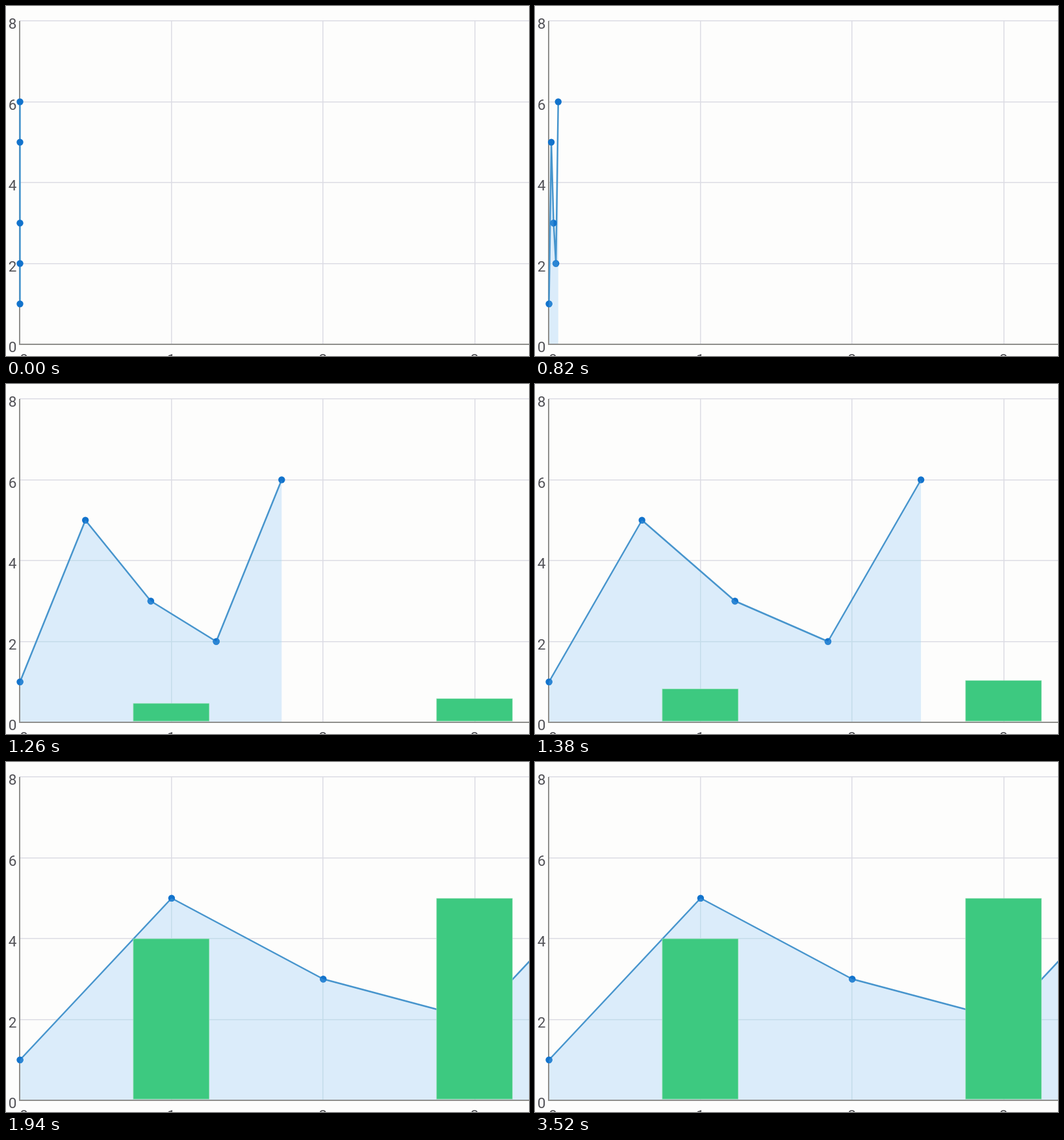
An HTML page with a canvas for the animation above (3540 ms loop, 805 by 539 pixels).

```html
<!DOCTYPE html>
<html lang="en">
<head>
<meta charset="utf-8">
<title>Line and bar chart</title>
<style>
  html, body { margin: 0; width: 100%; height: 100%; overflow: hidden; background: #fdfdfc; }
  canvas { display: block; }
</style>
</head>
<body>
<canvas id="chart" width="805" height="539"></canvas>
<script>
const W = 805, H = 539, LOOP = 3540;
const X0 = 21.5, Y0 = 521, STEP = 233.4, UNIT = 62.25;
const values = [1, 5, 3, 2, 6];
const bars = [{ x: 1, value: 4 }, { x: 3, value: 5 }];
const ctx = document.getElementById('chart').getContext('2d');

const px = x => X0 + x * STEP;
const py = y => Y0 - y * UNIT;
const clamp = v => Math.min(1, Math.max(0, v));

// Pictures are held 20, 20 and 100 ms; each group of three spans 8 ticks of motion.
function ticks(ms) {
  const t = ms + 20, rest = t % 140;
  return Math.floor(t / 140) * 8 + (rest < 20 ? 0 : rest < 40 ? 3 : 6);
}

const lineEase = n => Math.pow(clamp((n - 34.8) / 53.2), 3);

function barEase(n) {
  const p = clamp((n - 32.6) / 61.3);
  return p ? Math.pow(2, 10 * (p - 1)) : 0;
}

function grid(color) {
  ctx.fillStyle = color;
  for (let v = 2; v <= 8; v += 2) ctx.fillRect(21, Math.round(py(v)) - 1, W, 1.5);
  for (let x = 1; x <= 3; x++) ctx.fillRect(Math.round(px(x)) - 1, 23, 1.5, Y0 - 23);
}

function axes() {
  ctx.fillStyle = '#8f8f8c';
  ctx.fillRect(20, 23, 2, 499);
  ctx.fillRect(20, 520, W, 2);
}

function labels() {
  ctx.fillStyle = '#515156';
  ctx.font = '22.5px Roboto, sans-serif';
  ctx.textAlign = 'right';
  for (let v = 0; v <= 8; v += 2) ctx.fillText(v, 16.5, py(v) + 12);
  ctx.textAlign = 'center';
  for (let x = 0; x <= 3; x++) ctx.fillText(x, x ? px(x) - 0.5 : 27.5, 552);
}

function dots(points, color) {
  ctx.fillStyle = color;
  for (const [x, y] of points) {
    ctx.beginPath();
    ctx.arc(x, y, 5.2, 0, Math.PI * 2);
    ctx.fill();
  }
}

function line(scale) {
  const points = values.map((v, i) => [px(i * scale), py(v)]);
  const stroke = new Path2D();
  points.forEach(([x, y]) => stroke.lineTo(x, y));
  const area = new Path2D(stroke);
  area.lineTo(points[4][0], 520);
  area.lineTo(X0, 520);
  area.closePath();

  ctx.save();
  ctx.clip(area);
  ctx.fillStyle = '#dbecfa';
  ctx.fillRect(22, 0, W, 520);
  grid('#c4dcea');
  ctx.restore();

  ctx.strokeStyle = '#4795cd';
  ctx.lineWidth = 2.5;
  ctx.lineJoin = 'round';
  ctx.stroke(stroke);
  dots(points, '#1273cc');
  ctx.save();
  ctx.clip(area);
  dots(points, '#2c86d4');
  ctx.restore();
}

function bar({ x, value }, scale) {
  const left = px(x - 0.25) - 1, top = py(value * scale);
  const height = 519.5 - top;
  if (height < 2) return;
  ctx.fillStyle = '#8fdfb0';
  ctx.fillRect(left, top, STEP / 2 + 0.8, height);
  ctx.fillStyle = '#3dc980';
  ctx.fillRect(left + 0.8, top + 0.7, STEP / 2 - 0.8, height - 1.4);
}

function draw(now) {
  const n = ticks(now % LOOP);
  ctx.fillStyle = '#fdfdfc';
  ctx.fillRect(0, 0, W, H);
  grid('#dcdce4');
  axes();
  line(lineEase(n));
  bars.forEach(b => bar(b, barEase(n)));
  labels();
}

const start = performance.now();
function loop() {
  draw(performance.now() - start);
  requestAnimationFrame(loop);
}
loop();
</script>
</body>
</html>
```
